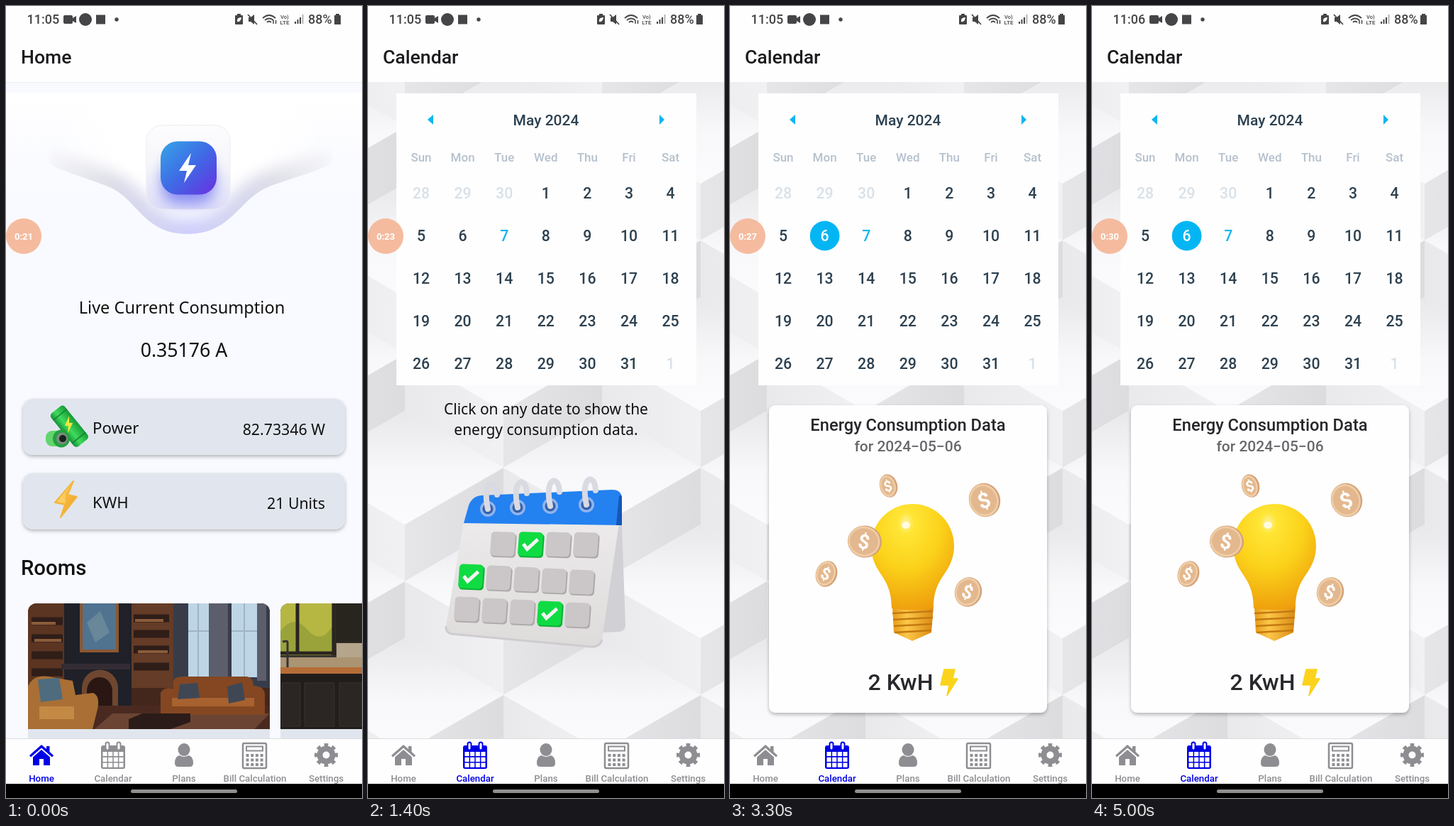
An HTML page for the animation above (5.1 s loop, 502 by 1115 pixels).

```html
<!DOCTYPE html>
<html lang="en">
<head>
<meta charset="utf-8">
<title>Energy app</title>
<style>
  html, body { margin: 0; width: 100%; height: 100%; overflow: hidden; background: #fff; }
  svg { display: block; width: 502px; height: 1115px; }
  text { font-family: Roboto, sans-serif; font-weight: 500; }
  .sans { font-family: "Noto Sans", "Open Sans", sans-serif; font-weight: 400; fill: #111; }
  .mid { text-anchor: middle; }
  .end { text-anchor: end; }
  .tab { color: #8e8e92; fill: currentColor; font-size: 13.3px; }
  .tab.on { color: #0000e6; }
</style>
</head>
<body>
<svg viewBox="0 0 502 1115">
  <defs>
    <linearGradient id="sky" x2="0" y2="1"><stop stop-color="#fff"/><stop offset="1" stop-color="#f9faff"/></linearGradient>
    <linearGradient id="white"><stop stop-color="#fff" stop-opacity="0"/><stop offset=".25" stop-color="#fff"/><stop offset=".75" stop-color="#fff"/><stop offset="1" stop-color="#fff" stop-opacity="0"/></linearGradient>
    <linearGradient id="rim"><stop stop-color="#dcdce4" stop-opacity=".2"/><stop offset=".22" stop-color="#dcdce6"/><stop offset=".5" stop-color="#cdcdfc"/><stop offset=".78" stop-color="#dcdce6"/><stop offset="1" stop-color="#dcdce4" stop-opacity=".2"/></linearGradient>
    <linearGradient id="plate" x2="0" y2="1"><stop stop-color="#fdfdfe"/><stop offset=".5" stop-color="#f5f5fa"/><stop offset="1" stop-color="#dedef8"/></linearGradient>
    <linearGradient id="app" x2="1" y2="1"><stop stop-color="#35a5e6"/><stop offset=".5" stop-color="#3f6ae6"/><stop offset="1" stop-color="#6a2fe0"/></linearGradient>
    <linearGradient id="gold" x2="1" y2="1"><stop stop-color="#ffd65c"/><stop offset="1" stop-color="#ee9a1e"/></linearGradient>
    <linearGradient id="green" x2="1" y2="0"><stop stop-color="#169036"/><stop offset=".4" stop-color="#3fdc5c"/><stop offset="1" stop-color="#179a36"/></linearGradient>
    <linearGradient id="top" x2="0" y2="1"><stop stop-color="#e8e8eb"/><stop offset=".55" stop-color="#f8f8fa"/><stop offset="1" stop-color="#fbfbfd"/></linearGradient>
    <linearGradient id="left" x2="1" y2="0"><stop stop-color="#e9e9eb"/><stop offset="1" stop-color="#f1f1f3"/></linearGradient>
    <linearGradient id="right" x2="1" y2="0"><stop stop-color="#e6e6e8"/><stop offset="1" stop-color="#dcdcdf"/></linearGradient>
    <linearGradient id="page" x2="0" y2="1"><stop stop-color="#eceaea"/><stop offset="1" stop-color="#dedbdb"/></linearGradient>
    <radialGradient id="bulb" cx=".42" cy=".18" r=".85"><stop stop-color="#fff3a0"/><stop offset=".12" stop-color="#ffe535"/><stop offset=".5" stop-color="#fbd21a"/><stop offset="1" stop-color="#ee9c0c"/></radialGradient>
    <linearGradient id="screw"><stop stop-color="#e59a17"/><stop offset=".35" stop-color="#fcc74a"/><stop offset="1" stop-color="#d98a12"/></linearGradient>
    <filter id="blur" x="-50%" y="-50%" width="200%" height="200%"><feGaussianBlur stdDeviation="10"/></filter>
    <filter id="shadow"><feDropShadow dx="0" dy="2.5" stdDeviation="2.5" flood-opacity=".28"/></filter>
    <path id="curve" d="M60 222C95 239 130 247 150 257C186 275 196 321 256 321C316 321 328 275 365 257C385 247 424 239 460 222"/>
    <clipPath id="bowl"><path d="M60 222C95 239 130 247 150 257C186 275 196 321 256 321C316 321 328 275 365 257C385 247 424 239 460 222V122H60Z"/></clipPath>
    <clipPath id="body"><path d="M0 107H502V1031H0Z"/></clipPath>
    <clipPath id="room"><path d="M31 1031V853A12 12 0 0 1 43 841H360A12 12 0 0 1 372 853V1031Z"/></clipPath>
    <clipPath id="kitchen"><path d="M387 1031V853A12 12 0 0 1 399 841H502V1031Z"/></clipPath>
    <g id="cube">
      <path d="M0 0L139 80L0 160L-139 80Z" fill="url(#top)"/>
      <path d="M-139 80L0 160V240L-139 160Z" fill="url(#left)"/>
      <path d="M139 80L0 160V240L139 160Z" fill="url(#right)"/>
    </g>
  </defs>
  <path d="M0 0H502V1115H0Z" fill="#fefefe"/>

  <g id="home">
    <path d="M0 107H502V1031H0Z" fill="#f9faff"/>
    <path d="M0 107.5H502" stroke="#eceef4"/>
    <path d="M0 122H502V260H0Z" fill="url(#sky)"/>
    <g clip-path="url(#bowl)">
      <path d="M60 122H460V322H60Z" fill="url(#white)"/>
      <use href="#curve" fill="none" stroke="url(#rim)" stroke-width="42" filter="url(#blur)"/>
    </g>
    <rect x="198" y="168" width="118" height="118" rx="22" fill="url(#plate)" stroke="#ebebf2"/>
    <rect x="220" y="218" width="74" height="60" rx="22" fill="#686df2" opacity=".75" filter="url(#blur)"/>
    <rect x="218" y="190.500" width="79" height="75" rx="24" fill="url(#app)"/>
    <path d="M261 207L244 232H255L251 249L268 224H257Z" fill="#fff"/>
    <text class="mid sans" x="248" y="433" font-size="23.600">Live Current Consumption</text>
    <text class="mid sans" x="251" y="494" font-size="26.700">0.35176 A</text>
    <g fill="#e1e6ee" filter="url(#shadow)">
      <rect x="24" y="553" width="454" height="79" rx="14"/>
      <rect x="24" y="657.500" width="454" height="79" rx="14"/>
    </g>
    <text class="sans" x="122" y="601.500" font-size="22.200">Power</text>
    <text class="sans end" x="450" y="604" font-size="21.300">82.73346 W</text>
    <text class="sans" x="122" y="706.500" font-size="22.200">KWH</text>
    <text class="sans end" x="450" y="708" font-size="21.300">21 Units</text>
    <g transform="rotate(-39 89 592)">
      <rect x="77" y="562" width="25" height="60" rx="5" fill="url(#green)"/>
      <path d="M77 571H102M77 613H102" stroke="#128031" stroke-width="1.500"/>
    </g>
    <path d="M89 577L83 591H88L87 602L94 587H89Z" fill="#f3e63c"/>
    <rect x="56" y="598" width="28" height="22" rx="9" fill="#62d56e"/>
    <ellipse cx="78" cy="609" rx="12" ry="12.500" fill="#22a23f"/>
    <ellipse cx="79" cy="609" rx="8" ry="8.500" fill="#7d8a80"/>
    <circle cx="80" cy="609" r="5" fill="#15231b"/>
    <path d="M95 669L69 699L83 702L77 720L100 691L87 688Z" fill="url(#gold)" stroke="#f5b53c" stroke-width="2" stroke-linejoin="round"/>
    <path d="M95 670L72 698L84 700L83 687Z" fill="#ffe08a" opacity=".5"/>
    <text x="21" y="801" font-size="29.300" fill="#111">Rooms</text>

    <g clip-path="url(#room)">
      <path d="M31 841H372V1031H31Z" fill="#44271c"/>
      <path d="M31 841H106V960H31Z" fill="#5b3522"/>
      <path d="M176 841H236V960H176Z" fill="#643c27"/>
      <path d="M36 866H80M36 890H80M36 914H80M36 938H80M180 862H230M180 884H230M180 906H230M180 930H230" stroke="#2f1d18" stroke-width="11"/>
      <path d="M36 869H70M40 893H78M182 865H222M186 909H228" stroke="#8a5c3a" stroke-width="4"/>
      <path d="M82 841H177V985H82Z" fill="#1f2028"/>
      <path d="M104 841H159V910H104Z" fill="#8b5731"/>
      <path d="M108 841H155V906H108Z" fill="#507390"/>
      <path d="M114 868L133 852L146 882L126 896Z" fill="#68889a"/>
      <path d="M78 926H175V934H78Z" fill="#342c34"/>
      <path d="M107 992V960A20 20 0 0 1 158 960V992Z" fill="#6f4730"/>
      <path d="M114 992V964A16 17 0 0 1 150 964V992Z" fill="#2a1713"/>
      <path d="M236 841H372V960H236Z" fill="#383c49"/>
      <path d="M257 945V841H286V945ZM318 945V841H354V945Z" fill="#bed5e6"/>
      <path d="M271 841V945M336 841V945M257 880H286M318 880H354" stroke="#9fb4c6" stroke-width="2"/>
      <path d="M286 841H313V950H286ZM354 841H367V950H354Z" fill="#5c5f6b"/>
      <path d="M31 985H372V1018H31Z" fill="#4a2a20"/>
      <path d="M150 996H372L350 1018H125Z" fill="#6c4433"/>
      <path d="M31 1018V958Q38 941 60 944L94 950L98 970L123 967Q133 972 129 990L122 1018Z" fill="#a96f34"/>
      <path d="M47 986H96V1004H47Z" fill="#c48945"/>
      <path d="M45 948L75 946L80 976L49 980Z" fill="#4e6c7e"/>
      <path d="M218 990V967Q222 958 236 961V950Q238 944 250 944H340Q348 945 349 957Q365 958 365 970V998H218Z" fill="#844722"/>
      <path d="M234 974H350V986H234Z" fill="#a8622f"/>
      <path d="M245 955L270 953L273 974L242 976ZM312 958L333 952L337 977L314 982Z" fill="#3f4755"/>
      <path d="M173 1004L192 996H260V1008L232 1018H173Z" fill="#2b1c19"/>
      <path d="M31 1018H372V1031H31Z" fill="#e1e6ee"/>
    </g>
    <g clip-path="url(#kitchen)">
      <path d="M387 841H502V1031H387Z" fill="#39352e"/>
      <path d="M387 841H462V914H387Z" fill="#b6b743"/>
      <path d="M387 880Q405 855 425 878T462 870V908H387Z" fill="#9aa33a"/>
      <path d="M411 841V910M462 841V914M387 911H466" stroke="#292520" stroke-width="5"/>
      <path d="M465 841H502V896H465Z" fill="#28251f"/>
      <path d="M466 897H502V931H466Z" fill="#b5a58a"/>
      <path d="M387 917H502V932H387Z" fill="#aa9472"/>
      <path d="M397 932V896Q397 893 390 895" fill="none" stroke="#333" stroke-width="3"/>
      <path d="M387 931H502V940H387Z" fill="#b66d37"/>
      <path d="M387 940H502V1018H387Z" fill="#211d1b"/>
      <path d="M389 953H415V1014H389ZM421 953H463V1014H421ZM470 953H502V1014H470Z" fill="#2b2623" stroke="#39322e"/>
      <path d="M387 1018H502V1031H387Z" fill="#e1e6ee"/>
    </g>
  </g>

  <g id="calendar">
    <g id="cubes" clip-path="url(#body)"></g>
    <path d="M40 123H463V534H40Z" fill="#fefefe"/>
    <text class="mid" x="251" y="167.500" font-size="21" fill="#2d4150">May 2024</text>
    <path d="M84 160L92 153V167ZM418 160L411 153V167Z" fill="#0db5f2"/>
    <g id="days" class="mid"></g>

    <g id="hint">
      <text class="sans mid" x="251" y="575" font-size="21">Click on any date to show the</text>
      <text class="sans mid" x="251" y="604" font-size="21">energy consumption data.</text>
      <path d="M340 700Q356 705 358 732L363 872Q363 880 354 881L330 882Z" fill="#d0d0d5"/>
      <path d="M135 726L110 873Q109 882 118 884L314 902Q327 903 330 892L354 729Z" fill="url(#page)"/>
      <path d="M110 873Q109 882 118 884L314 902Q327 903 330 892" fill="none" stroke="#cfccd0" stroke-width="3"/>
      <path d="M135 728L142 703Q147 690 160 689L344 681Q358 681 358 694V731Z" fill="#2481f0"/>
      <path d="M350 731L354 690Q358 686 358 694V731Z" fill="#1556b8"/>
      <g id="cells"></g>
    </g>

    <circle id="spin" cx="251" cy="610" r="18.500" pathLength="360" fill="none" stroke="#25a4ee" stroke-width="4"/>

    <g id="card">
      <rect x="55" y="562" width="392" height="433" rx="9" fill="#fefefe" filter="url(#shadow)"/>
      <text class="mid" x="251" y="598" font-size="23.700" fill="#27272b">Energy Consumption Data</text>
      <text class="mid" x="251" y="627" font-size="21" fill="#68686c">for 2024−05−06</text>
      <path d="M229 845H287L284 882L257 894L231 882Z" fill="url(#screw)"/>
      <path d="M229 855L286 852M230 864L286 861M231 873L285 870M232 882L284 879" stroke="#c47a10" stroke-width="2.500"/>
      <path d="M228 848C228 800 200 801 199 760A58.500 59 0 0 1 316 760C315 801 287 800 287 848Q257 853 228 848Z" fill="url(#bulb)"/>
      <ellipse cx="248" cy="731" rx="6" ry="5" fill="#fff" opacity=".75"/>
      <g id="coins"></g>
      <text x="194.500" y="963" font-size="32" fill="#29292d">2 KwH</text>
      <path d="M302 934H317L314 947H321L306 971L309 956H297Z" fill="#fbd31d" stroke="#fbd31d" stroke-width="1.500" stroke-linejoin="round"/>
    </g>
  </g>

  <text id="title" x="21" y="81" font-size="26.600" fill="#1b1b1e"></text>

  <g fill="#454547">
    <text id="clock" x="29.500" y="25" font-size="18"></text>
    <path d="M83 13H92Q94 13 94 15V17L99 14V24L94 21V23Q94 25 92 25H83Q81 25 81 23V15Q81 13 83 13Z"/>
    <circle cx="112" cy="19" r="9"/>
    <path d="M127 12.500H140V25.500H127Z"/>
    <circle cx="156" cy="19" r="2.700"/>
    <path d="M326 11H331V13H333Q334 13 334 14V25Q334 26 333 26H324Q323 26 323 25V14Q323 13 324 13H326Z"/>
    <path d="M326 22Q325 16 332 16Q331 23 326 22Z" fill="#fff"/>
    <path d="M342 16H345L350 12V26L345 22H342Z"/>
    <path d="M341 12L354 26" stroke="#454547" stroke-width="1.800"/>
    <g fill="none" stroke="#454547" stroke-width="1.800"><path d="M362 17Q371 9 380 17M365 20Q371 15 377 20M368 23Q371 20 374 23"/><path d="M377 25V20M380.500 20V25" stroke-width="1.500"/></g>
    <text x="387" y="18" font-size="7.500">Vo)</text><text x="386.500" y="26" font-size="8">LTE</text>
    <path d="M407 22H409V25H407ZM410.500 19H412.500V25H410.500ZM414 16H416V25H414Z"/>
    <path d="M417.500 12H419.500V25H417.500Z" opacity=".4"/>
    <text x="426" y="25" font-size="18">88%</text>
    <path d="M465 11H470V13H472V26H463V13H465Z"/>
  </g>

  <path d="M0 1031H502V1096H0Z" fill="#fefefe"/>
  <path d="M0 1031.500H502" stroke="#dcdce0"/>
  <g class="tab" id="tabHome">
    <path d="M50 1040L33 1055L35 1057.500L50 1044.500L65 1057.500L67 1055L61.500 1050V1042H57V1046Z"/>
    <path d="M50 1047L38 1057.500V1069H47V1060H53V1069H62V1057.500Z"/>
    <text class="mid" x="50" y="1092">Home</text>
  </g>
  <g class="tab" id="tabCalendar">
    <rect x="134" y="1041" width="34" height="33" rx="3"/>
    <path d="M136.500 1053H165.500M136.500 1060.800H165.500M136.500 1068.600H165.500" stroke="#fff" stroke-width="6.200" stroke-dasharray="6.100 1.533"/>
    <path d="M143 1039V1045M159 1039V1045" stroke="currentColor" stroke-width="7" stroke-linecap="round"/>
    <path d="M143 1039V1045M159 1039V1045" stroke="#fff" stroke-width="3" stroke-linecap="round"/>
    <text class="mid" x="151" y="1092">Calendar</text>
  </g>
  <g class="tab">
    <ellipse cx="251" cy="1047" rx="8.500" ry="9"/>
    <path d="M245 1055Q251 1059 257 1055Q264 1056 264 1066Q264 1071 259 1071H243Q238 1071 238 1066Q238 1056 245 1055Z"/>
    <text class="mid" x="251" y="1092">Plans</text>
    <rect x="334" y="1038" width="33" height="35" rx="2" fill="none" stroke="currentColor" stroke-width="2.500"/>
    <rect x="339" y="1042.500" width="23" height="6" fill="none" stroke="currentColor" stroke-width="2"/>
    <path d="M338.500 1055H363M338.500 1061.500H363M338.500 1068H363" stroke="currentColor" stroke-width="4" stroke-dasharray="4 2.700"/>
    <text class="mid" x="351" y="1092">Bill Calculation</text>
    <g fill="none" stroke="currentColor">
      <circle cx="451.500" cy="1054.500" r="9" stroke-width="8"/>
      <circle cx="451.500" cy="1054.500" r="14" stroke-width="5" pathLength="16" stroke-dasharray="1 1" stroke-dashoffset=".5"/>
    </g>
    <text class="mid" x="451.500" y="1092">Settings</text>
  </g>
  <path d="M0 1095H502V1115H0Z"/>
  <rect x="176" y="1103" width="150" height="5" rx="2.500" fill="#8f8f8f"/>

  <circle cx="25" cy="324" r="25" fill="#f5bb9f"/>
  <text id="timer" class="mid" x="25" y="329" font-size="13" style="font-weight:700" fill="#fff"></text>
</svg>
<script>
const $ = id => document.getElementById(id);
const fill = (id, parts) => { $(id).innerHTML = parts.join(''); };
const show = (id, on) => { $(id).style.display = on ? '' : 'none'; };
const ease = p => { p = Math.min(1, Math.max(0, p)); return p * p * (3 - 2 * p); };

// Isometric cube wallpaper
const cubes = [];
for (let row = 0; row < 8; row++)
  for (let x = row % 2 ? -87 : -226; x < 650; x += 278)
    cubes.push(`<use href="#cube" x="${x}" y="${-70 + row * 160}"/>`);
fill('cubes', cubes);

// Month grid
const colX = i => 75 + (i % 7) * 58.6;
const days = 'Sun Mon Tue Wed Thu Fri Sat'.split(' ').map((name, i) =>
  `<text x="${colX(i)}" y="219" font-size="17" fill="#b6c1cd">${name}</text>`);
for (let i = 0; i < 35; i++) {
  const date = i < 3 ? 28 + i : (i - 3) % 31 + 1;
  const off = i < 3 || i > 33;
  const y = 263 + Math.floor(i / 7) * 60;
  const color = off ? '#d9e1e8' : date === 7 ? '#10b4f0' : '#2d4150';
  const text = `<text x="${colX(i)}" y="${y + 7.5}" font-size="21.3" fill="${color}"`;
  days.push(i === 8
    ? `<g id="pick"><circle id="dot" cx="${colX(i)}" cy="${y + .5}" r="20.9" fill="#03b6f3"/>${text} id="six">6</text></g>`
    : `${text}>${date}</text>`);
}
fill('days', days);

// Desk calendar: tiles, ticks and rings
const tile = (x, y, ticked) => `<g transform="translate(${x} ${y}) skewX(-4) skewY(2)">
  <rect x="-16" y="-15" width="35" height="34" rx="5" fill="${ticked ? '#0fae35' : '#aeaaab'}"/>
  <rect x="-17" y="-17" width="34" height="34" rx="5" fill="${ticked ? '#0fdc42' : '#cbc7c8'}"/>
  ${ticked ? '<path d="M-10 0L-4 7L10 -7" fill="none" stroke="#f4f4f4" stroke-width="5"/>' : ''}</g>`;
const ring = (x, y) => `<circle cx="${x}" cy="${y}" r="11" fill="#8fb4ee"/><circle cx="${x}" cy="${y}" r="7.5" fill="#3663ab"/>
  <path d="M${x} ${y}C${x - 9} ${y - 40} ${x + 12} ${y - 46} ${x + 13} ${y - 20}" fill="none" stroke="#d9dae2" stroke-width="8" stroke-linecap="round"/>`;
const cells = [];
for (let row = 0; row < 3; row++)
  for (let col = row ? 0 : 1; col < 5; col++)
    cells.push(tile(151 + col * 39 - row * 6, 757 + row * 46 + col * (row ? 2 : .3),
      [2, 0, 3][row] === col));
[[169, 708], [211, 706], [257, 704], [308, 702]].forEach(p => cells.push(ring(...p)));
fill('cells', cells);

const coin = ([x, y, rx, ry, turn]) => `<g transform="translate(${x} ${y}) rotate(${turn})">
  <ellipse rx="${rx}" ry="${ry}" fill="#d3a27a"/><ellipse cx="-1" rx="${rx - 1.5}" ry="${ry - 1}" fill="#efcda6"/>
  <ellipse cx="-1" rx="${rx - 4}" ry="${ry - 4}" fill="#e4b88e"/>
  <text class="mid" x="-1" y="${ry * .45}" font-size="${ry * 1.25}" style="font-weight:700" fill="#fff">$</text></g>`;
fill('coins', [
  [223.5, 675.5, 12.5, 16.5, -15], [359, 695.5, 22, 24, -20], [190, 754, 24, 22.5, 10],
  [136, 799.5, 15, 18.5, 20], [336, 825, 19, 21, 20]
].map(coin));

const ticks = [600, 1200, 1700, 2200, 2700, 3200, 3800, 4400, 4900];
const PICKED = 2400, LOADED = 3200;

function spin(t) {
  const turns = (t - 2610) / 667, cycle = Math.floor(turns), p = turns - cycle;
  const head = 270 * ease(p * 2), tail = 270 * ease(p * 2 - 1);
  const angle = 34 + cycle * 270 + tail + (t - 2700) * .2;
  $('spin').setAttribute('stroke-dasharray', `${Math.max(4, head - tail)} 360`);
  $('spin').setAttribute('transform', `rotate(${angle} 251 610)`);
}

function draw() {
  const t = Math.floor(performance.now() % 5100 / 100) * 100;
  const home = t < 600, picked = t >= PICKED;
  show('home', home);
  show('calendar', !home);
  show('hint', !picked);
  show('spin', picked && t < LOADED);
  show('card', t >= LOADED);
  show('dot', picked);
  $('six').setAttribute('fill', picked ? '#fff' : '#2d4150');
  $('pick').setAttribute('opacity', t >= 1900 && t <= PICKED ? .2 : 1);
  $('title').textContent = home ? 'Home' : 'Calendar';
  $('tabHome').classList.toggle('on', home);
  $('tabCalendar').classList.toggle('on', !home);
  $('clock').textContent = t < 4900 ? '11:05' : '11:06';
  $('timer').textContent = '0:' + (21 + ticks.filter(at => t >= at).length);
  spin(t);
  requestAnimationFrame(draw);
}
draw();
</script>
</body>
</html>
```
